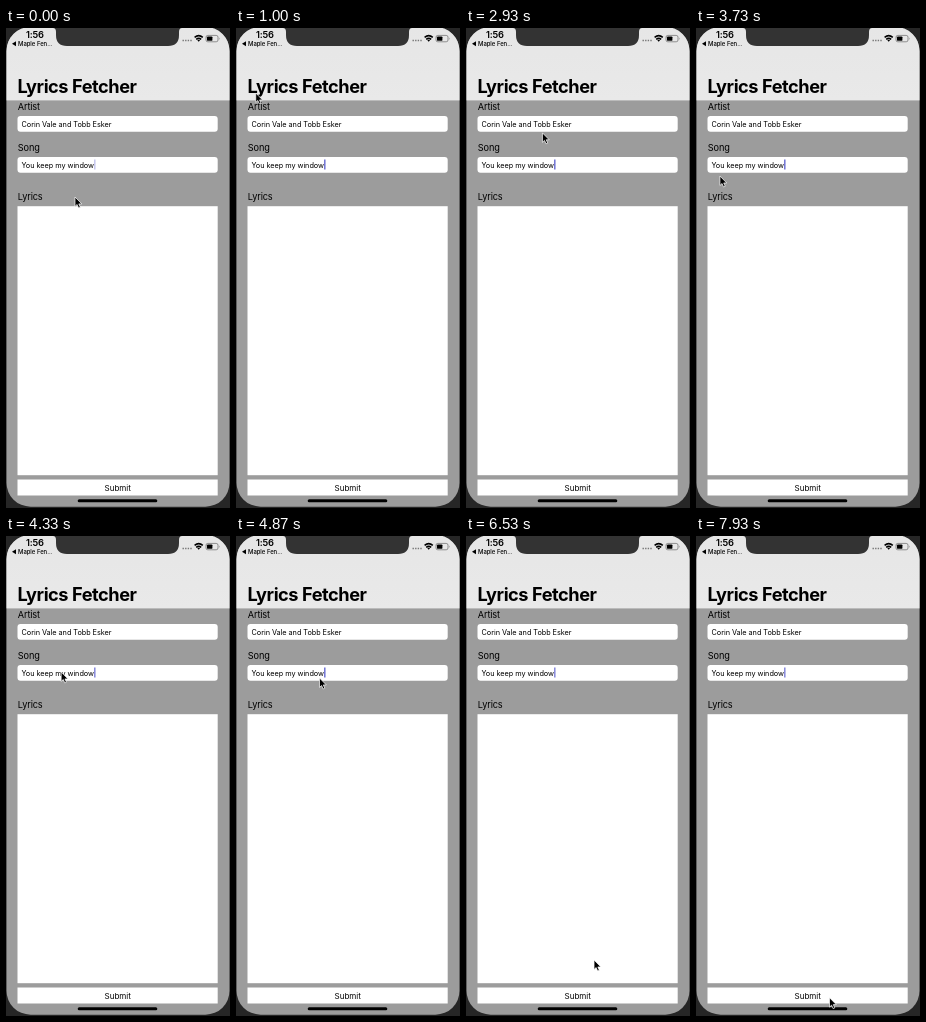
An HTML page that plays this animation: 224x480 px, repeating every 8 s.

```html
<!DOCTYPE html>
<html lang="en">
<head>
<meta charset="utf-8">
<title>Lyrics Fetcher</title>
<style>
  html, body { margin: 0; width: 100%; height: 100%; overflow: hidden; background: #262626; }
  svg { display: block; width: 224px; height: 480px; font-family: Inter, "Liberation Sans", sans-serif; }
  .title { font-size: 18.2px; font-weight: 700; letter-spacing: -.45px; }
  .label { font-size: 9.2px; letter-spacing: -.15px; }
  .input { font-size: 7.3px; letter-spacing: -.04px; }
  .clock { font-size: 9.3px; font-weight: 600; letter-spacing: -.2px; }
  .back { font-size: 5.9px; font-weight: 500; }
</style>
</head>
<body>
<svg viewBox="0 0 224 480">
  <defs>
    <clipPath id="screen"><rect x=".5" y="-1" width="223" height="479.7" rx="24"/></clipPath>
    <linearGradient id="bar" x2="0" y2="1">
      <stop stop-color="#e6e6e6"/><stop offset="1" stop-color="#e9e9e9"/>
    </linearGradient>
  </defs>

  <g clip-path="url(#screen)">
    <rect width="224" height="480" fill="#9c9c9c"/>
    <rect width="224" height="72.4" fill="url(#bar)"/>
    <path d="M47 0Q50 0 50 4V7Q50 18 61 18H162Q173 18 173 7V4Q173 0 176 0Z" fill="#333"/>

    <text class="clock" x="20" y="10.3">1:56</text>
    <path d="M10 13.3V18.3L6 15.8Z"/>
    <text class="back" x="12" y="18">Maple Fen...</text>

    <path d="M176.5 12.5H186" stroke="#777" stroke-width="1.4" stroke-dasharray="1.4 1.2"/>
    <g fill="none" stroke="#000" stroke-width="1.5">
      <path d="M188.6 9.4Q192.7 5.8 196.8 9.4M190.2 11.4Q192.7 9.3 195.2 11.4"/>
      <path d="M191.3 12.3L192.7 13.8L194.1 12.3Q192.7 11.2 191.3 12.3Z" fill="#000" stroke="none"/>
    </g>
    <rect x="200" y="7.4" width="12" height="6.4" rx="1.8" fill="none" stroke="#777" stroke-width=".8"/>
    <rect x="201" y="8.4" width="5.4" height="4.4" rx=".9"/>
    <path d="M213 9.4Q214.2 10.6 213 11.8Z" fill="#777"/>

    <text class="title" x="11.5" y="64.9">Lyrics Fetcher</text>

    <g class="label">
      <text x="11.8" y="81.8">Artist</text>
      <text x="11.8" y="122.8">Song</text>
      <text x="11.8" y="171.8">Lyrics</text>
    </g>

    <g fill="#fff">
      <rect x="11.5" y="88" width="200.2" height="15.7" rx="3"/>
      <rect x="11.5" y="129" width="200.2" height="15.7" rx="3"/>
      <rect x="11.5" y="178.2" width="200.2" height="269"/>
      <rect x="11.5" y="451.5" width="200.2" height="16"/>
    </g>
    <g class="input">
      <text x="15.5" y="98.7">Corin Vale and Tobb Esker</text>
      <text x="15.5" y="139.7">You keep my window</text>
    </g>
    <text x="111.7" y="462.8" font-size="8" text-anchor="middle">Submit</text>
    <rect id="caret" x="88.3" y="131.5" width="1.1" height="10" fill="#3b3fc4"/>
    <rect x="71.7" y="471.2" width="79.6" height="3" rx="1.5"/>
  </g>

  <path id="arrow" d="M0 0V9.4L2.1 7.5L3.6 10.9L5.3 10.2L3.8 6.9H6.8Z"
        stroke="#fff" stroke-width=".7" stroke-linejoin="round"/>
</svg>
<script>
const LOOP = 8000, STEP = 1000 / 15, MOVE = 400, BLINK = 16;
const arrow = document.getElementById('arrow');
const caret = document.getElementById('caret');

// Pointer stops: [arrival ms, x, y]
const stops = [
  [0, 69, 169], [530, 24, 78], [800, 19, 65], [1370, 65, 65], [1800, 111, 64.5],
  [2270, 66, 85], [2670, 21, 104], [3000, 83, 105], [3530, 24, 149], [3720, 24, 149],
  [3930, 18, 68], [4130, 106, 64], [4400, 46, 149], [4800, 83.5, 142],
  [5600, 104, 250], [6130, 121, 366], [6620, 129, 432], [7130, 133.5, 461.7]
];

const ease = u => u * u * (3 - 2 * u);

// Rest at each stop, then spend at most MOVE ms on the way to the next
function pointer(t) {
  const i = stops.findIndex(s => s[0] > t);
  if (i < 0) return stops.at(-1).slice(1);
  const [t0, x0, y0] = stops[i - 1], [t1, x1, y1] = stops[i];
  const go = Math.max(t0, t1 - MOVE);
  const k = ease(Math.max(0, (t - go) / (t1 - go)));
  return [x0 + (x1 - x0) * k, y0 + (y1 - y0) * k];
}

// A short dip, then a slightly paler half of the blink
function caretAlpha(n) {
  const p = n % BLINK;
  return p === 0 ? 0.4 : p < BLINK / 2 ? 0.85 : 1;
}

const start = performance.now();
function draw(now) {
  const n = Math.floor(Math.max(0, now - start) % LOOP / STEP + 0.06);
  const [x, y] = pointer(n * STEP);
  arrow.setAttribute('transform', `translate(${x.toFixed(2)} ${y.toFixed(2)})`);
  caret.setAttribute('opacity', caretAlpha(n));
  requestAnimationFrame(draw);
}
draw(start);
</script>
</body>
</html>
```
